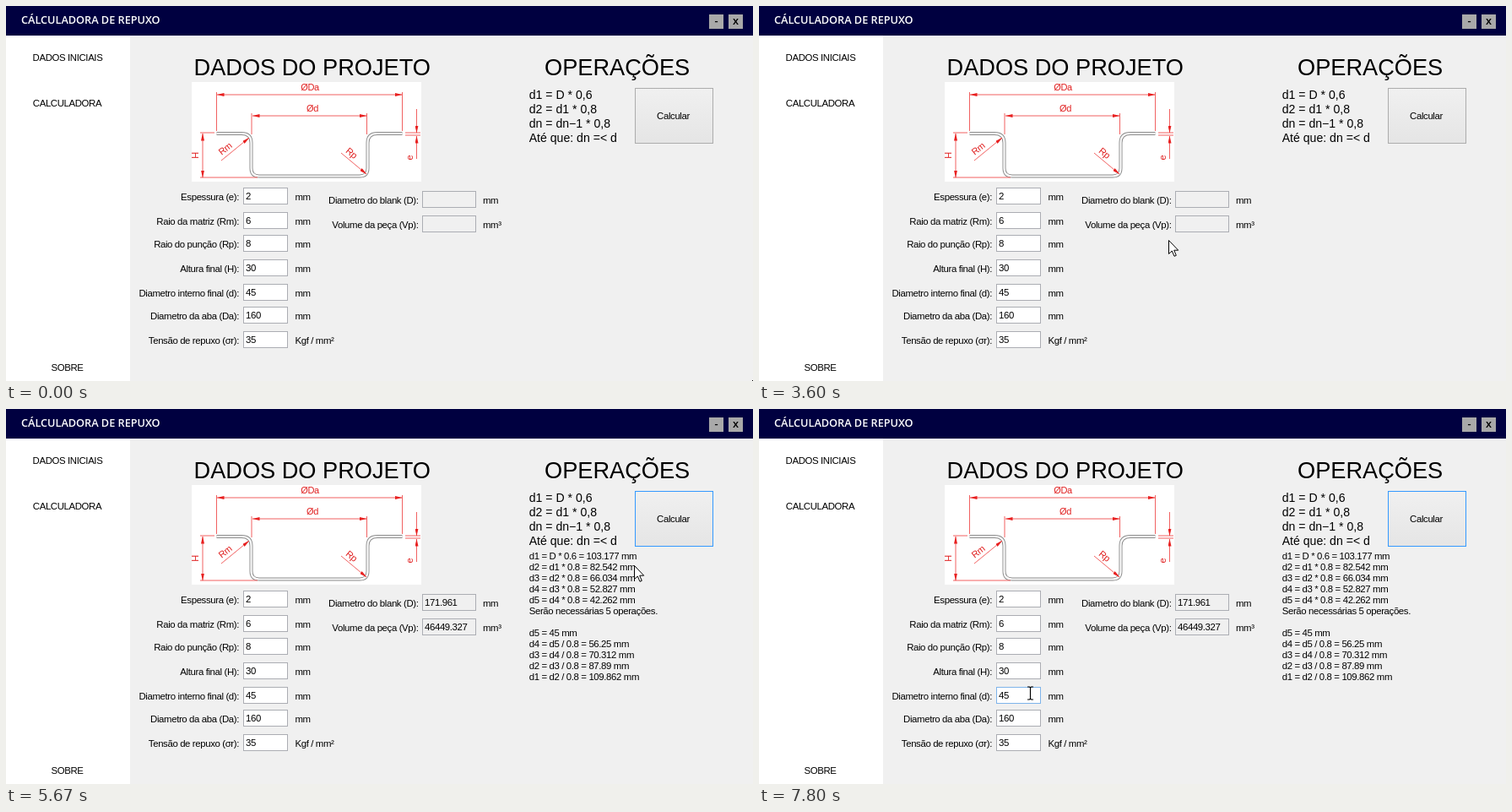
An HTML page for the animation above (8000 ms loop, 885x444 px).

```html
<!DOCTYPE html>
<html lang="pt">
<head>
<meta charset="utf-8">
<title>Cálculadora de repuxo</title>
<style>
  html, body { margin: 0; width: 100%; height: 100%; overflow: hidden; background: #f0f0f0; }
  svg { display: block; font: 11.4px "Liberation Sans", Arial, sans-serif; letter-spacing: -.37px; }
  rect { shape-rendering: crispEdges; }
  .title { font-size: 27.2px; letter-spacing: 0; }
  .rule { font-size: 14.1px; letter-spacing: 0; }
  .bar { font: 600 12.7px "Open Sans", sans-serif; letter-spacing: 0; }
  .mid { text-anchor: middle; }
  .end { text-anchor: end; }
  .dim { stroke: #f05050; fill: none; stroke-width: .9; }
  .red text { fill: #e02020; letter-spacing: -.3px; font-size: 11px; text-anchor: middle; }
</style>
</head>
<body>
<svg id="stage" width="885" height="444" viewBox="0 0 885 444">
  <defs>
    <linearGradient id="idle" x2="0" y2="1"><stop stop-color="#f0f0f0"/><stop offset="1" stop-color="#e5e5e5"/></linearGradient>
    <linearGradient id="hover" x2="0" y2="1"><stop stop-color="#ecf4fc"/><stop offset="1" stop-color="#dcecfc"/></linearGradient>
    <linearGradient id="down" x2="0" y2="1"><stop stop-color="#daecfc"/><stop offset="1" stop-color="#c4e0fc"/></linearGradient>
    <marker id="tip" markerUnits="userSpaceOnUse" markerWidth="9" markerHeight="4" refX="8.5" refY="2" orient="auto-start-reverse">
      <path d="M0 0L9 2L0 4Z" fill="#e82020"/>
    </marker>
    <path id="profile" d="M249.500 151H279Q290.500 151 290.500 162V192Q290.500 201.500 300 201.500H419Q428.500 201.500 428.500 192V162Q428.500 151 440 151H469.500"/>
  </defs>
  <rect width="885" height="444" fill="#f0f0f0"/>
  <rect y="35" width="147" height="409" fill="#fff"/>
  <rect width="885" height="35" fill="#000040"/>
  <text class="bar" x="18" y="21" fill="#fff">CÁLCULADORA DE REPUXO</text>
  <rect x="833" y="10" width="17" height="17" fill="#a9a9a9"/>
  <rect x="856" y="10" width="17" height="17" fill="#a9a9a9"/>
  <text class="bar mid" x="841.5" y="22">-</text>
  <text class="bar mid" x="864.5" y="22">x</text>
  <text class="mid" x="73" y="65">DADOS INICIAIS</text>
  <text class="mid" x="72.5" y="119">CALCULADORA</text>
  <text class="mid" x="72.5" y="432">SOBRE</text>
  <text class="title" x="222.5" y="82">DADOS DO PROJETO</text>
  <text class="title" x="638" y="82">OPERAÇÕES</text>

  <rect x="220" y="90" width="272" height="118" fill="#fff"/>
  <g fill="none">
    <use href="#profile" stroke="#8c8c8c" stroke-width="4" stroke-linecap="butt"/>
    <use href="#profile" stroke="#fafafa" stroke-width="2.2"/>
  </g>
  <g class="dim">
    <path d="M249.500 102V148M469.500 102V148M291 127V152M427.500 127V152M230 150H247M230 203H298M473 150H491M473 153H491"/>
    <path d="M250 105H469" marker-start="url(#tip)" marker-end="url(#tip)"/>
    <path d="M292 130H427" marker-start="url(#tip)" marker-end="url(#tip)"/>
    <path d="M233 151V203" marker-start="url(#tip)" marker-end="url(#tip)"/>
    <path d="M486.500 122V150" marker-end="url(#tip)"/>
    <path d="M486.500 181V154" marker-end="url(#tip)"/>
    <path d="M255 183L288 156" marker-end="url(#tip)"/>
    <path d="M397 174L427 199" marker-end="url(#tip)"/>
  </g>
  <g class="red">
    <text x="360" y="100">ØDa</text>
    <text x="363" y="125">Ød</text>
    <text transform="translate(228 177) rotate(-90)">H</text>
    <text transform="translate(482 179.500) rotate(-90)">e</text>
    <text transform="translate(262 172) rotate(-38)">Rm</text>
    <text transform="translate(407 177) rotate(40)">Rp</text>
  </g>

  <g id="form"></g>
  <rect id="button" x="745.5" y="97.500" width="92" height="65"/>
  <text class="mid" x="790.5" y="134">Calcular</text>
  <g id="results"></g>
  <rect id="corner" x="884" y="443" width="1" height="1"/>
  <path id="arrow" d="M.5 .5V16.500L4.300 13L7 19.300L9.300 18.300L6.700 12.200H11.700Z" fill="#fff" stroke="#000"/>
  <path id="beam" d="M-3.500 -7.500H-1L0 -6.500L1 -7.500H3.500M0 -6.500V6.500M-3.500 7.500H-1L0 6.500L1 7.500H3.500" fill="none" stroke="#000" stroke-width="1.200"/>
</svg>
<script>
const $ = id => document.getElementById(id);
const STEP = 1000 / 15, LOOP = 8000;

function add(parent, tag, attrs, text = '') {
  const node = document.createElementNS('http://www.w3.org/2000/svg', tag);
  for (const name in attrs) node.setAttribute(name, attrs[name]);
  node.textContent = text;
  return parent.appendChild(node);
}
const write = (parent, x, y, text, cls = '') => add(parent, 'text', { x, y, class: cls }, text);
const box = (x, y, width, fill) =>
  add($('form'), 'rect', { x: x + .5, y: y + .5, width, height: 19, fill, stroke: '#abadb3' });

const fields = [
  ['Espessura (e):', 2, 215], ['Raio da matriz (Rm):', 6, 244], ['Raio do punção (Rp):', 8, 271],
  ['Altura final (H):', 30, 300], ['Diametro interno final (d):', 45, 329],
  ['Diametro da aba (Da):', 160, 356], ['Tensão de repuxo (σr):', 35, 385, 'Kgf / mm²']
].map(([label, value, y, unit = 'mm']) => {
  write($('form'), 276, y + 15, label, 'end');
  write($('form'), 342.5, y + 15, unit);
  const rect = box(281, y, 52, '#fff');
  write($('form'), 284, y + 14, value);
  return rect;
});
const diameterField = fields[4];

[['Diametro do blank (D):', '171.961', 219, 'mm'], ['Volume da peça (Vp):', '46449.327', 248, 'mm³']]
  .forEach(([label, value, y, unit]) => {
    write($('form'), 488.5, y + 15, label, 'end');
    write($('form'), 565, y + 15, unit);
    box(493, y, 63, '#f0f0f0');
    write($('results'), 496, y + 14, value);
  });

['d1 = D * 0,6', 'd2 = d1 * 0,8', 'dn = dn−1 * 0,8', 'Até que: dn =< d']
  .forEach((line, i) => write($('form'), 619.7, 110 + 17 * i, line, 'rule'));

['d1 = D * 0.6 = 103.177 mm', 'd2 = d1 * 0.8 = 82.542 mm', 'd3 = d2 * 0.8 = 66.034 mm',
 'd4 = d3 * 0.8 = 52.827 mm', 'd5 = d4 * 0.8 = 42.262 mm', 'Serão necessárias 5 operações.', '',
 'd5 = 45 mm', 'd4 = d5 / 0.8 = 56.25 mm', 'd3 = d4 / 0.8 = 70.312 mm',
 'd2 = d3 / 0.8 = 87.89 mm', 'd1 = d2 / 0.8 = 109.862 mm']
  .forEach((line, i) => write($('results'), 619.7, 178 + 13 * i, line));

// Pointer path: [step, x, y]
const path = [
  [0, 900, 470], [20, 900, 470], [21, 729, 436], [26, 420, 346], [28, 420, 346], [30, 394, 355],
  [34, 332.5, 345], [41, 318, 345], [50, 318, 345], [54, 485, 277], [63, 758, 147], [64, 758, 147],
  [65, 763, 144], [81, 763, 144], [85, 744, 185], [89, 645, 277], [94, 691, 193], [99, 535, 337],
  [106, 346, 322], [108, 346, 322], [117, 321.5, 336.5], [120, 321.5, 336.5]
];

function pointerAt(step) {
  const i = path.findIndex(key => key[0] > step);
  const [s0, x0, y0] = path[i - 1], [s1, x1, y1] = path[i], next = path[i + 1];
  let u = (step - s0) / (s1 - s0);
  if (next && next[1] === x1 && next[2] === y1) u *= 2 - u; // slow down into a rest
  return [x0 + (x1 - x0) * u, y0 + (y1 - y0) * u];
}

const inside = (x, y, l, t, r, b) => x >= l && x < r && y >= t && y < b;
const show = (node, on) => node.setAttribute('visibility', on ? 'visible' : 'hidden');

function draw(now) {
  const step = Math.floor((now % LOOP + 4) / STEP) % 120;
  const [x, y] = pointerAt(step);
  const onField = inside(x, y, 281, 329, 334, 349);
  const onButton = inside(x, y, 745, 97, 838, 163);
  const pressed = step >= 68 && step < 71;
  const state = pressed ? 'down' : onButton ? 'hover' : 'idle';

  $('button').setAttribute('fill', `url(#${state})`);
  $('button').setAttribute('stroke',
    { down: '#569de5', hover: '#7eb4ea', idle: step >= 68 ? '#3399ff' : '#acacac' }[state]);
  diameterField.setAttribute('stroke', onField ? '#7eb4ea' : '#abadb3');
  show($('results'), step >= 71);
  show($('corner'), step < 7);
  show($('arrow'), !onField);
  show($('beam'), onField);
  $('arrow').setAttribute('transform', `translate(${Math.round(x)} ${Math.round(y)})`);
  $('beam').setAttribute('transform', `translate(${Math.floor(x) + .5} ${Math.floor(y) + .5})`);
}

const start = performance.now();
function tick() {
  draw(performance.now() - start);
  requestAnimationFrame(tick);
}
tick();
</script>
</body>
</html>
```
